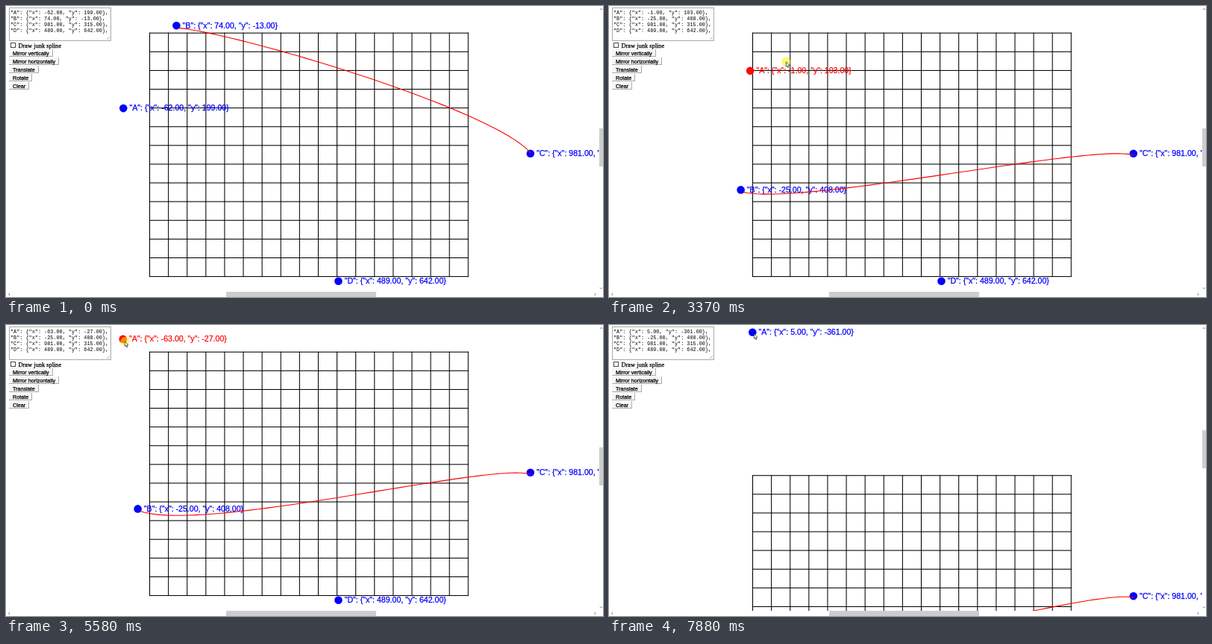
Write an HTML page with a canvas that moves like this. It is 800 px wide and 390 px high and loops after 8000 ms.

```html
<!DOCTYPE html>
<html lang="en">
<head>
<meta charset="utf-8">
<title>Spline editor</title>
<style>
html, body { margin: 0; width: 100%; height: 100%; overflow: hidden; background: #fff; }
canvas { display: block; }
</style>
</head>
<body>
<canvas id="stage" width="800" height="390"></canvas>
<script>
const g = document.getElementById('stage').getContext('2d');
const LOOP = 8000, STEP = 109.6, SCALE = 0.523, LEFT = 189.7, TOP = 33;
const BLUE = '#0000ff', RED = '#ff0a0a', SANS = '"Liberation Sans", Arial, sans-serif';

// Pointer key points in world units: [step, x, y]
const path = [
  [1, 774, 491], [5, 108, -11], [11, 74, -13], [14, -46, 342], [15, -52, 369],
  [18, -25, 408], [22, -25, 408], [26, -62, 199], [29, -62, 199], [30, -1, 103],
  [31, 91, 80], [34, 569, 476], [36, 613, 540], [39, 431, 355], [40, 298, 258],
  [46, -228, 179], [50, -63, -27], [51, -58, -21], [58, 91, -166],
  [59, 99, -275], [68, 5, -361], [69, 9, -357]
];

// Steps at which each dot is pressed, last moved and released
const drags = {
  A: { press: 29, stop: 68, release: 72 },
  B: { press: 11, stop: 18, release: 21 }
};

const clamp = (v, lo, hi) => Math.min(hi, Math.max(lo, v));

function pointerAt(n) {
  const i = clamp(path.findIndex(p => p[0] >= n), 1, path.length - 1);
  const a = path[i - 1], b = path[n > path[i][0] ? path.length - 1 : i];
  const k = clamp((n - a[0]) / (b[0] - a[0]), 0, 1);
  return [1, 2].map(j => a[j] + (b[j] - a[j]) * k);
}

const scrollAt = n => 165.5 * Math.sin(clamp((n - 54.4) / 5.6, 0, 1) * Math.PI / 2);

function box(x, y, w, h, color) {
  g.fillStyle = color;
  g.fillRect(x, y, w, h);
}

function frame(x, y, w, h, color) {
  g.strokeStyle = color;
  g.lineWidth = 1;
  g.strokeRect(x + 0.5, y + 0.5, w - 1, h - 1);
}

function text(s, x, y, font, color = '#000', weight = 0.25) {
  g.font = font;
  g.fillStyle = g.strokeStyle = color;
  g.lineWidth = weight;
  g.fillText(s, x, y);
  if (weight) g.strokeText(s, x, y);
}

function disc(x, y, r, color) {
  g.fillStyle = color;
  g.beginPath();
  g.arc(x, y, r, 0, 7);
  g.fill();
}

function line(points, color, width) {
  g.strokeStyle = color;
  g.lineWidth = width;
  g.beginPath();
  points.forEach(p => g.lineTo(...p));
  g.stroke();
}

const json = (name, p) =>
  `"${name}": {"x": ${p[0].toFixed(2)}, "y": ${p[1].toFixed(2)}}`;

function drawGrid(shift) {
  const cell = 48 * SCALE, thick = 2 * SCALE, x = 192, y = 35.7 + shift;
  for (let i = 0; i <= 17; i++) box(x + i * cell, y, thick, 13 * cell + thick, '#000');
  for (let i = 0; i <= 13; i++) box(x, y + i * cell, 17 * cell + thick, thick, '#000');
}

// Catmull-Rom segment from b to c
function spline(a, b, c, d) {
  const pts = [];
  for (let t = 0; t <= 0.981; t += 0.02) {
    const t2 = t * t, t3 = t2 * t;
    pts.push([0, 1].map(i => 3.2 + 0.5 * (
      a[i] * (2 * t2 - t - t3) + b[i] * (2 - 5 * t2 + 3 * t3) +
      c[i] * (t + 4 * t2 - 3 * t3) + d[i] * (t3 - t2))));
  }
  return pts;
}

function drawPanel(pts) {
  box(4, 2, 137, 45, '#fff');
  frame(4, 2, 137, 45, '#a9a9a9');
  Object.keys(pts).forEach((name, i) =>
    text(json(name, pts[name]) + ',', 6, 11 + 8 * i, '6.83px "Liberation Mono", monospace', '#000', 0));
  line([[135, 45], [139, 41]], '#999', 0.7);
  line([[137.5, 45], [139, 43.5]], '#999', 0.7);

  frame(6, 49, 7, 7, '#444');
  text('Draw junk spline', 16.5, 55.5, '8.4px "Liberation Serif", serif');

  ['Mirror vertically', 'Mirror horizontally', 'Translate', 'Rotate', 'Clear'].forEach((label, i) => {
    const y = 58 + 11 * i;
    g.font = '7.2px ' + SANS;
    const w = Math.round(g.measureText(label).width + 10);
    box(4, y, w, 10, '#f7f7f7');
    box(4, y + 9, w, 1, '#aaa');
    box(3 + w, y, 1, 10, '#aaa');
    text(label, 9, y + 7.5, g.font);
  });
}

function drawBars(shift) {
  box(795, 164 - shift * 0.139, 5, 51, '#cdcdcd');
  box(295, 383, 201, 7, '#cdcdcd');
  const chevron = (x, y, dx, dy) =>
    line([[x - dx - dy, y - dy - dx], [x, y], [x - dx + dy, y - dy + dx]], '#555', 0.8);
  chevron(797.5, 3.5, 0, -1.5);
  chevron(797.5, 379, 0, 1.5);
  chevron(3.5, 386.5, -1.5, 0);
  chevron(790, 386.5, 1.5, 0);
}

function drawPointer(x, y, pressed) {
  if (pressed) disc(x, y, 6, 'rgba(255,240,0,.55)');
  g.beginPath();
  [[0, 0], [0, 6.5], [1.5, 5.2], [2.5, 7.8], [3.5, 7.3], [2.5, 5], [4.5, 4.8]]
    .forEach(([dx, dy]) => g.lineTo(x + dx, y + dy));
  g.closePath();
  g.fillStyle = '#fff';
  g.fill();
  g.strokeStyle = '#222';
  g.lineWidth = 0.7;
  g.stroke();
}

function draw(ms) {
  const n = Math.floor((ms + 30) / STEP);
  const shift = scrollAt(n);
  const toScreen = p => [LEFT + p[0] * SCALE, TOP + shift + p[1] * SCALE];

  // A dragged dot trails the pointer by one step
  const dragged = d => pointerAt(clamp(n - 1, d.press, d.stop)).map(Math.round);
  const active = name => name in drags && n >= drags[name].press && n < drags[name].release;
  const pts = { A: dragged(drags.A), B: dragged(drags.B), C: [981, 315], D: [489, 642] };

  box(0, 0, 800, 390, '#fff');
  g.save();
  g.beginPath();
  g.rect(0, 0, 795, 383);
  g.clip();
  drawGrid(shift);
  for (const name in pts) {
    const [x, y] = toScreen(pts[name]), color = active(name) ? RED : BLUE;
    disc(x, y, 5.3, color);
    text(json(name, pts[name]), x + 8.2, y + 3.3, '10.6px ' + SANS, color);
  }
  line(spline(...Object.values(pts).map(toScreen)), '#ff0000', 1.1);
  g.restore();

  drawPanel(pts);
  drawBars(shift);
  if (n > 0) drawPointer(...toScreen(pointerAt(n)), active('A') || active('B'));
}

function tick() {
  draw(performance.now() % LOOP);
  requestAnimationFrame(tick);
}
tick();
</script>
</body>
</html>
```
